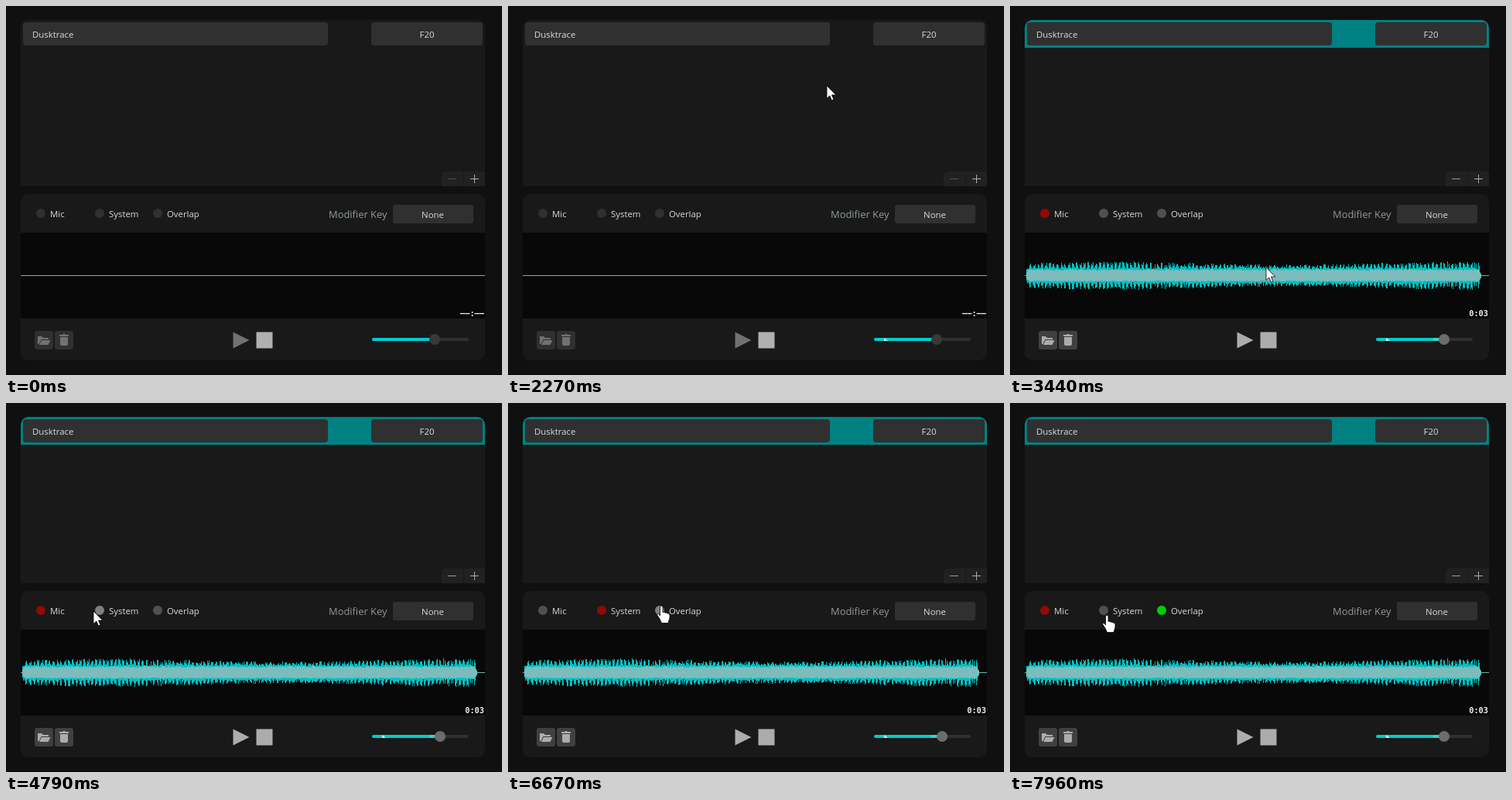
An HTML page for the animation above (7990 ms loop, 641x477 px).

```html
<!DOCTYPE html>
<html lang="en">
<head>
<meta charset="utf-8">
<title>Soundboard</title>
<style>
html, body { margin: 0; width: 100%; height: 100%; overflow: hidden; background: #101010; }
svg { display: block; width: 100vw; height: 100vh; --on: #b0b0b0; --off: #717171; }
text { font: 11.4px "Open Sans", "Noto Sans", sans-serif; fill: #d3deda; }
.mid { text-anchor: middle; }
.crisp { shape-rendering: crispEdges; }
.panel { fill: #191919; }
.field, .tool, .lamp { fill: #303030; }
.icon, #play { fill: var(--off); }
#stop { fill: var(--on); }
#minus { stroke: #505050; }
#plus { stroke: var(--on); }
#knob { fill: #383838; }
#modifier { font-size: 12.9px; fill: #8f9e9b; }
#clock { font: bold 10.3px "DejaVu Sans Mono", monospace; fill: #f0f0f0; text-anchor: end; }
.cursor { fill: #fff; stroke: #000; stroke-width: .8; stroke-linejoin: round; }

.busy #minus, .busy #plus { stroke: var(--off); }
.busy #stop { fill: var(--off); }
.busy #modifier { fill: #696969; }

.ready { --off: #acacac; --on: #acacac; }
.ready #minus { stroke: #9a9a9a; }
.ready #modifier { fill: #969696; }
.ready #knob { fill: #6c6c6c; }
.ready .tool { fill: #404040; }
.ready .lamp { fill: #505050; }
.ready .lamp.hover { fill: #808080; }
.ready .lamp.on { fill: #900a06; }
.ready #overlap.on { fill: #00d000; }
</style>
</head>
<body>
<svg id="stage" viewBox="0 0 641 477" preserveAspectRatio="none">
  <rect width="641" height="477" fill="#101010"/>
  <rect y="476" width="641" height="1" fill="#060606"/>

  <!-- sound list -->
  <path class="panel" d="M19 28a10 10 0 0 1 10-10h580a10 10 0 0 1 10 10v203q0 2-2 2H21q-2 0-2-2z"/>
  <path id="row" d="M19 54V28a10 10 0 0 1 10-10h580a10 10 0 0 1 10 10v26z" fill="#008080"/>
  <rect class="field" x="22" y="21" width="394" height="30" rx="4"/>
  <rect class="field" x="472" y="21" width="144" height="30" rx="4"/>
  <text x="34" y="41">Dusktrace</text>
  <text class="mid" x="544" y="41">F20</text>
  <path d="M563 233v-13q0-6 6-6h22v19z" fill="#212121"/>
  <path d="M592 214h27v17q0 2-2 2h-25z" fill="#212121"/>
  <path id="minus" class="crisp" d="M571 223.5h11"/>
  <path id="plus" class="crisp" d="M600 223.5h11M605.5 218v11"/>

  <!-- player -->
  <rect class="panel" x="19" y="243" width="600" height="215" rx="10"/>
  <circle class="lamp" id="mic" cx="45" cy="268" r="6"/>
  <circle class="lamp" id="system" cx="121" cy="268" r="6"/>
  <circle class="lamp" id="overlap" cx="196" cy="268" r="6"/>
  <text x="57" y="273">Mic</text>
  <text x="133" y="273">System</text>
  <text x="208" y="273">Overlap</text>
  <text id="modifier" x="417" y="274">Modifier Key</text>
  <rect class="field" x="500" y="257" width="104" height="24" rx="3"/>
  <text class="mid" x="551.5" y="274">None</text>

  <rect x="19" y="293" width="600" height="111" fill="#080808"/>
  <path class="crisp" d="M19 348.5h600" stroke="#66b8aa"/>
  <g id="wave" class="crisp">
    <path id="peaks" stroke="#00bfc0"/>
    <path id="core" stroke="#7cbcbc"/>
  </g>
  <text id="clock" x="618" y="401"></text>

  <rect class="tool" x="37" y="420" width="24" height="24" rx="3"/>
  <rect class="tool" x="63" y="420" width="24" height="24" rx="3"/>
  <path class="icon" d="M41 437v-10h5l2 2h7v2H45.5l-3 6zM43 438l3-6h11.5l-3 6z"/>
  <path class="icon" d="M69 427v-2h4l1-1h2l1 1h4v2zM70 428h10v9q0 2-2 2h-6q-2 0-2-2z"/>
  <path id="play" d="M293.5 421.5l21 10.5-21 10.5z"/>
  <rect id="stop" x="323.5" y="421.5" width="21" height="21"/>

  <rect x="473" y="429" width="125" height="4" rx="2" fill="#303030"/>
  <rect x="473" y="429" width="81" height="4" rx="2" fill="#00cccc"/>
  <rect id="gain" x="547" y="429" width="8" height="4" fill="#46caca"/>
  <path id="nick" d="M486 429l5 4h-5z" fill="#d8efef"/>
  <circle id="knob" cy="431" r="7"/>

  <path id="arrow" class="cursor" d="M0 0V16.5L3.8 13 6.4 19 9 18 6.5 12H11.8z"/>
  <path id="hand" class="cursor" d="M-2.5 1C-2.5-1 1-1 1 1V7.5q2-1 3.2.8 2-.9 3 .8 2.6-.6 2.8 1.9v4l-2 6.5H-.5L-3 16l-3-4.5c-.6-2 1-2.7 2-1.5l1.5 2z"/>
</svg>
<script>
const LOOP = 7990, ENTER = 540, SELECT = 2470, LOADED = 3050, HOVER_LAG = 40;
const el = id => document.getElementById(id);
const show = (id, on) => el(id).style.display = on ? '' : 'none';

// The pointer rests between moves; each one glides to x, y.
const move = (start, end, x, y) => ({ start, end, x, y });
const moves = [
  move(0, ENTER, 542, 468),
  move(ENTER, 1010, 372, 263),
  move(1750, 2500, 430, 33),
  move(2640, 2940, 398, 121),
  move(2940, 3440, 331, 338),
  move(3840, 4660, 118, 269),
  move(4750, 5400, 40, 266),
  move(5590, 5850, 121, 262),
  move(6070, 6370, 199, 263),
  move(6900, 7400, 118, 268),
  move(7470, 7740, 45, 268),
  move(7780, 7960, 126, 275)
];

// The microphone is on once loaded; every click flips a lamp.
const lamps = [
  { id: 'mic', x: 45, flips: [LOADED, 5480, 7750] },
  { id: 'system', x: 121, flips: [5870, 7440] },
  { id: 'overlap', x: 196, flips: [6750] }
];

function pointerAt(t) {
  let x = 0, y = 0;
  for (const step of moves) {
    if (t < step.start) break;
    const k = Math.min(1, (t - step.start) / (step.end - step.start));
    x += (step.x - x) * k;
    y += (step.y - y) * k;
  }
  return { x: Math.round(x), y: Math.round(y) };
}

const isOver = (lamp, p) => Math.max(Math.abs(p.x - lamp.x), Math.abs(p.y - 268)) <= 7;

function buildWave() {
  let seed = 7, peaks = '', core = '';
  const random = () => (seed = seed * 16807 % 2147483647) / 2147483647;
  const bar = (x, up, down) => `M${x + .5} ${348 - Math.round(up)}V${349 + Math.round(down)}`;
  for (let x = 21; x < 609; x++) {
    const fade = Math.min(1, (x - 18) / 6, (609 - x) / 4);
    const swell = 15 + 2 * Math.cos((x - 140) / 72);
    const tall = x % 5 < 3 && random() < .9;
    const reach = () => fade * (tall ? swell * (.75 + .3 * random()) : 8 + 3 * random());
    peaks += bar(x, reach(), reach());
    core += bar(x, fade * (6 + 2 * random()), fade * (6 + random()));
  }
  el('peaks').setAttribute('d', peaks);
  el('core').setAttribute('d', core);
}

function draw(t) {
  const loaded = t >= LOADED, selected = t >= SELECT;
  const pointer = pointerAt(t), felt = pointerAt(t - HOVER_LAG);
  el('stage').setAttribute('class', loaded ? 'ready' : selected ? 'busy' : 'idle');
  for (const lamp of lamps) {
    const { classList } = el(lamp.id);
    classList.toggle('on', lamp.flips.filter(time => time <= t).length % 2 === 1);
    classList.toggle('hover', isOver(lamp, felt));
  }
  show('row', selected);
  show('gain', selected);
  show('nick', t >= 660);
  show('wave', loaded);
  el('knob').setAttribute('cx', selected ? 561 : 554);
  el('clock').textContent = loaded ? '0:03' : '––:––';

  const pointing = loaded && lamps.some(lamp => isOver(lamp, pointer));
  show('hand', pointing);
  show('arrow', t >= ENTER && !pointing);
  for (const id of ['arrow', 'hand']) {
    el(id).setAttribute('transform', `translate(${pointer.x} ${pointer.y})`);
  }
}

buildWave();
const start = performance.now();
function tick(now) {
  draw(Math.max(0, now - start) % LOOP);
  requestAnimationFrame(tick);
}
tick(start);
</script>
</body>
</html>
```
